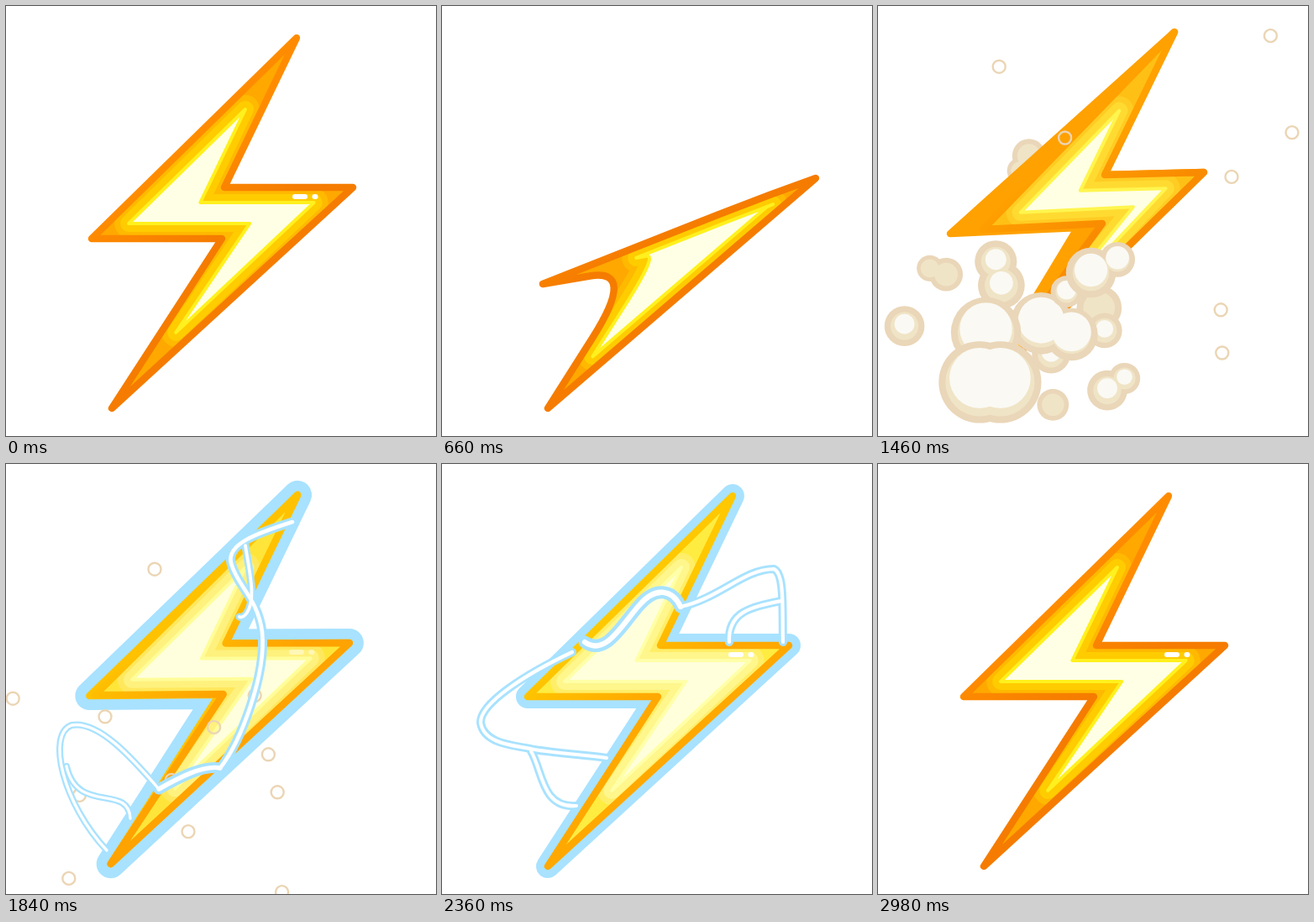
These frames come from a looping animation (512x512 px, 3 s). An HTML page with a canvas:

```html
<!DOCTYPE html>
<html lang="en">
<head>
<meta charset="utf-8">
<title>Lightning bolt</title>
<style>
  html, body { margin: 0; width: 100%; height: 100%; overflow: hidden; background: #fff; }
  canvas { display: block; width: 100vmin; height: 100vmin; }
</style>
</head>
<body>
<canvas id="stage" width="512" height="512"></canvas>
<script>
const ctx = document.getElementById('stage').getContext('2d');
const LOOP = 3000, STEP = 20;
const clamp = v => Math.max(0, Math.min(1, v));
const lerp = (a, b, k) => a + (b - a) * k;
const toward = (a, b, k) => [lerp(a[0], b[0], k), lerp(a[1], b[1], k)];
const smooth = k => k * k * (3 - 2 * k);
const easeOut = k => 1 - (1 - k) ** 2;
const span = (t, a, b) => clamp((t - a) / (b - a));

function mix(a, b, k) {
  const part = (h, i) => parseInt(h.slice(i, i + 2), 16);
  return 'rgb(' + [0, 2, 4].map(i => Math.round(lerp(part(a, i), part(b, i), k))) + ')';
}

function stroke(path, color, width) {
  ctx.strokeStyle = color;
  ctx.lineWidth = width;
  ctx.stroke(path);
}

// --- Bolt ---
// Corners: top, right notch, right tip, bottom tip, left notch, left tip.
// notch and bend round the two notches; inset and fit size the bright core.
const home = {
  pts: [[346,38], [260,216], [413,216], [126,479], [257,277], [102,277]],
  notch: 0, bend: 0, side: 0, charge: 0, shine: 1, inset: 18, fit: 1
};
const fold = {
  ...home, bend: .5, shine: 0, inset: 12,
  pts: [[330,248], [390,225], [445,205], [126,479], [232,312], [120,331]]
};
const dive = {
  ...home, notch: .4, charge: .75, shine: 0, inset: 13, fit: .72,
  pts: [[250,185], [178,309], [358,277], [60,430], [50,415], [38,408]]
};
const pop = {
  ...home, side: 39, charge: .35, shine: 0,
  pts: [[353,31], [270,201], [388,198], [118,462], [267,259], [125,266]]
};
const charged = { ...home, charge: 1 };
const squeeze = (pose, point, k) => ({ ...pose, pts: pose.pts.map(p => toward(p, point, k)) });

const track = [
  [0, home], [660, fold], [900, squeeze(fold, [440, 40], .5)], [1160, dive],
  [1280, squeeze(dive, [100, 450], .4)], [1460, pop], [2100, charged, easeOut],
  [2640, charged], [2960, home], [LOOP, home]
];

function blend(a, b, k) {
  const out = { pts: a.pts.map((p, i) => toward(p, b.pts[i], k)) };
  for (const name in a) if (name !== 'pts') out[name] = lerp(a[name], b[name], k);
  return out;
}

function poseAt(t) {
  const n = track.findIndex(s => s[0] > t);
  const [from, a] = track[n - 1], [to, b, ease = smooth] = track[n];
  return blend(a, b, ease(span(t, from, to)));
}

// Moves every edge inward; sharp tips retreat by a limited length
function inset(pts, d) {
  const normal = (a, b) => {
    const dx = b[0] - a[0], dy = b[1] - a[1], len = Math.hypot(dx, dy) || 1;
    return [-dy / len, dx / len];
  };
  return pts.map((c, i) => {
    const n = normal(pts[(i + 5) % 6], c), m = normal(c, pts[(i + 1) % 6]);
    const f = d / Math.max(.01, 1 + n[0] * m[0] + n[1] * m[1]);
    const x = (n[0] + m[0]) * f, y = (n[1] + m[1]) * f;
    const cap = Math.min(1, 118 / (Math.hypot(x, y) || 1));
    return [c[0] + x * cap, c[1] + y * cap];
  });
}

function outline(pts, { notch, bend }) {
  const path = new Path2D();
  path.moveTo(...pts[0]);
  for (let i = 1; i < 6; i++) {
    const c = pts[i], r = i === 1 ? notch : i === 4 ? bend : 0;
    path.lineTo(...toward(c, pts[i - 1], r));
    path.quadraticCurveTo(...c, ...toward(c, pts[(i + 1) % 6], r));
  }
  path.closePath();
  return path;
}

function glowAt(t) {
  const level = smooth(span(t, 1620, 1760)) * (1 - smooth(span(t, 2720, 2950)));
  return level * (31 + 3 * Math.cos((t - 1840) / 1040 * 2 * Math.PI));
}

function drawBolt(t) {
  const b = poseAt(t), e = b.charge, glow = glowAt(t);
  const body = outline(b.pts, b);
  const inner = inset(b.pts, b.inset);
  const core = outline(inner.map(p => toward(inner[1], p, b.fit)), b);
  // The left corners are dragged sideways to show the bolt's thickness
  const depth = outline(b.pts.map(([x, y], i) => [x - b.side * (i === 5 ? 1 : i === 4 ? .75 : 0), y + (i > 3 ? b.side * .13 : 0)]), b);
  const top = mix('ff8c00', 'ffc800', e), low = mix('f57c00', 'ffa800', e);

  if (glow > 0) stroke(depth, '#a8e2ff', glow);
  if (b.side > 1) {
    ctx.fillStyle = top;
    ctx.fill(depth);
    stroke(depth, top, 8.5);
  }
  ctx.fillStyle = mix('ffa800', 'ffec40', e);
  ctx.fill(body);
  ctx.save();
  ctx.clip(body);
  stroke(core, mix('ffb900', 'ffee68', e), 34);
  stroke(core, mix('ffcc00', 'fff68c', e), 20);
  ctx.fillStyle = mix('ffffe6', 'ffffdc', e);
  ctx.fill(core);
  stroke(core, mix('fff01e', 'ffffa8', e), 4);
  ctx.restore();

  const edge = ctx.createLinearGradient(210, 190, 260, 270);
  edge.addColorStop(0, top);
  edge.addColorStop(1, low);
  stroke(body, edge, 8.5);

  if (b.shine > .7) {
    const [x, y] = b.pts[2];
    ctx.globalAlpha = (b.shine - .7) / .3;
    stroke(new Path2D(`M${x - 69},${y + 11}h12m11.5,0h1`), '#fff', 6);
    ctx.globalAlpha = 1;
  }
}

// --- Smoke ---
// A puff is a lobe with a smaller one beside it; it drifts away from the
// burst's centre while it shrinks to a ring. turn = null leaves one lobe.
function puff(x, y, r, turn = null, light = .6, ratio = .78, gap = 1.15) {
  const lobes = [[x, y, r]];
  if (turn !== null) lobes.push([x + Math.cos(turn) * r * gap, y + Math.sin(turn) * r * gap, r * ratio]);
  return { x, y, light, lobes };
}

const upper = {
  born: 1050, full: 1160, ring: 1460, centre: [325, 165], spread: .6,
  puffs: [
    puff(261, 160, 28, -.5), puff(385, 189, 27, -2.2), puff(378, 320, 18),
    puff(377, 288, 23, -1.7, .6, .9, 1.3), puff(212, 107, 17, -2.5, .5),
    puff(414, 84, 17, 2.3, .5), puff(430, 156, 20, .2, .5, .85)
  ]
};
const lower = {
  born: 1230, full: 1440, ring: 1840, centre: [190, 380], spread: .8,
  puffs: [
    puff(89, 324, 20, 3.5, 0), puff(43, 381, 24, null, .5), puff(150, 336, 28, -1.8, .5, .9),
    puff(207, 468, 19, null, 0), puff(258, 361, 27, null, 0),
    puff(205, 412, 23, null, .5), puff(264, 386, 21, null, .5), puff(194, 378, 37, .35, .75, .85),
    puff(222, 343, 19), puff(249, 322, 30, -.46, .66, .7, 1.3),
    puff(267, 452, 24, -.6, .5), puff(133, 388, 42, null, .75),
    puff(126, 443, 49, 0, .74, 1, .56)
  ]
};
const back = { ...lower, spread: .3, puffs: [puff(180, 184, 20, 2.1, 0)] };

function disc(x, y, r, color) {
  ctx.fillStyle = color;
  ctx.beginPath();
  ctx.arc(x, y, Math.max(0, r), 0, 7);
  ctx.fill();
}

function drawBurst({ born, full, ring, centre, spread, puffs }, t) {
  const gone = ring + 100;
  if (t < born || t > gone) return;
  const grow = easeOut(span(t, born, full));
  const k = span(t, full, ring), move = easeOut(k), shrink = smooth(k);
  for (const { x, y, light, lobes } of puffs) {
    const end = toward([x, y], centre, -spread);
    if (k > .82) {
      const path = new Path2D();
      path.arc(...toward([x, y], end, move), 7.5, 0, 7);
      stroke(path, '#ebd5b4', Math.max(.01, lerp(4, 2.4, span(k, .82, 1)) * (1 - span(t, ring, gone))));
      continue;
    }
    const now = lobes.map(([lx, ly, r]) => [...toward([lx, ly], end, move), lerp(r, 8, shrink) * grow]);
    for (const [lx, ly, r] of now) disc(lx, ly, r, '#ead6b8');
    for (const [lx, ly, r] of now) disc(lx, ly, r - Math.min(8, r * .3), '#f0e4c6');
    for (const [lx, ly, r] of now) disc(lx, ly - r * .1, r * light * (1 - shrink * .4), '#faf9f4');
  }
}

// --- Sparks ---
// Each set is drawn on, held, then wiped off from its tail
function sparks(from, open, shut, to, ...lines) {
  return {
    from, open, shut, to,
    lines: lines.map(([width, d]) => {
      const el = document.createElementNS('http://www.w3.org/2000/svg', 'path');
      el.setAttribute('d', d);
      return { width, path: new Path2D(d), len: el.getTotalLength() };
    })
  };
}

const arcs = [
  sparks(1660, 1800, 1900, 2080,
    [9, 'M285,97C290,130 298,160 287,177Q282,184 278,182'],
    [11, 'M341,69C300,82 262,95 268,118C275,145 300,160 305,200C310,250 280,330 255,362'],
    [13, 'M255,362C235,358 205,374 182,387'],
    [8, 'M182,387C150,350 110,305 78,311C48,322 68,405 120,460'],
    [8, 'M72,360C85,418 146,380 148,422']),
  sparks(2140, 2300, 2480, 2760,
    [15, 'M170,212C195,230 215,190 235,168C255,145 275,150 284,170'],
    [10, 'M284,170C330,160 360,125 395,125C408,130 405,170 406,212'],
    [10, 'M342,212C340,175 370,170 404,163'],
    [10, 'M155,224C100,250 45,285 46,308C50,335 90,335 110,340C140,345 170,346 196,350'],
    [10, 'M106,342C120,365 118,410 160,407'])
];

function drawSparks({ from, open, shut, to, lines }, t) {
  const head = smooth(span(t, from, open)), tail = smooth(span(t, shut, to));
  if (head - tail <= .001) return;
  for (const [color, scale] of [['#a8e2ff', 1], ['#fff', .42]]) {
    for (const { path, len, width } of lines) {
      ctx.setLineDash([len * (head - tail), len * 2]);
      ctx.lineDashOffset = -len * tail;
      stroke(path, color, width * scale);
    }
  }
  ctx.setLineDash([]);
}

function draw(t) {
  ctx.fillStyle = '#fff';
  ctx.fillRect(0, 0, 512, 512);
  ctx.lineCap = ctx.lineJoin = 'round';
  drawBurst(back, t);
  drawBolt(t);
  drawBurst(upper, t);
  drawBurst(lower, t);
  arcs.forEach(s => drawSparks(s, t));
}

const start = performance.now();
function tick() {
  const t = (performance.now() - start) % LOOP;
  draw(Math.floor(t / STEP) * STEP);
  requestAnimationFrame(tick);
}
draw(0);
requestAnimationFrame(tick);
</script>
</body>
</html>
```
